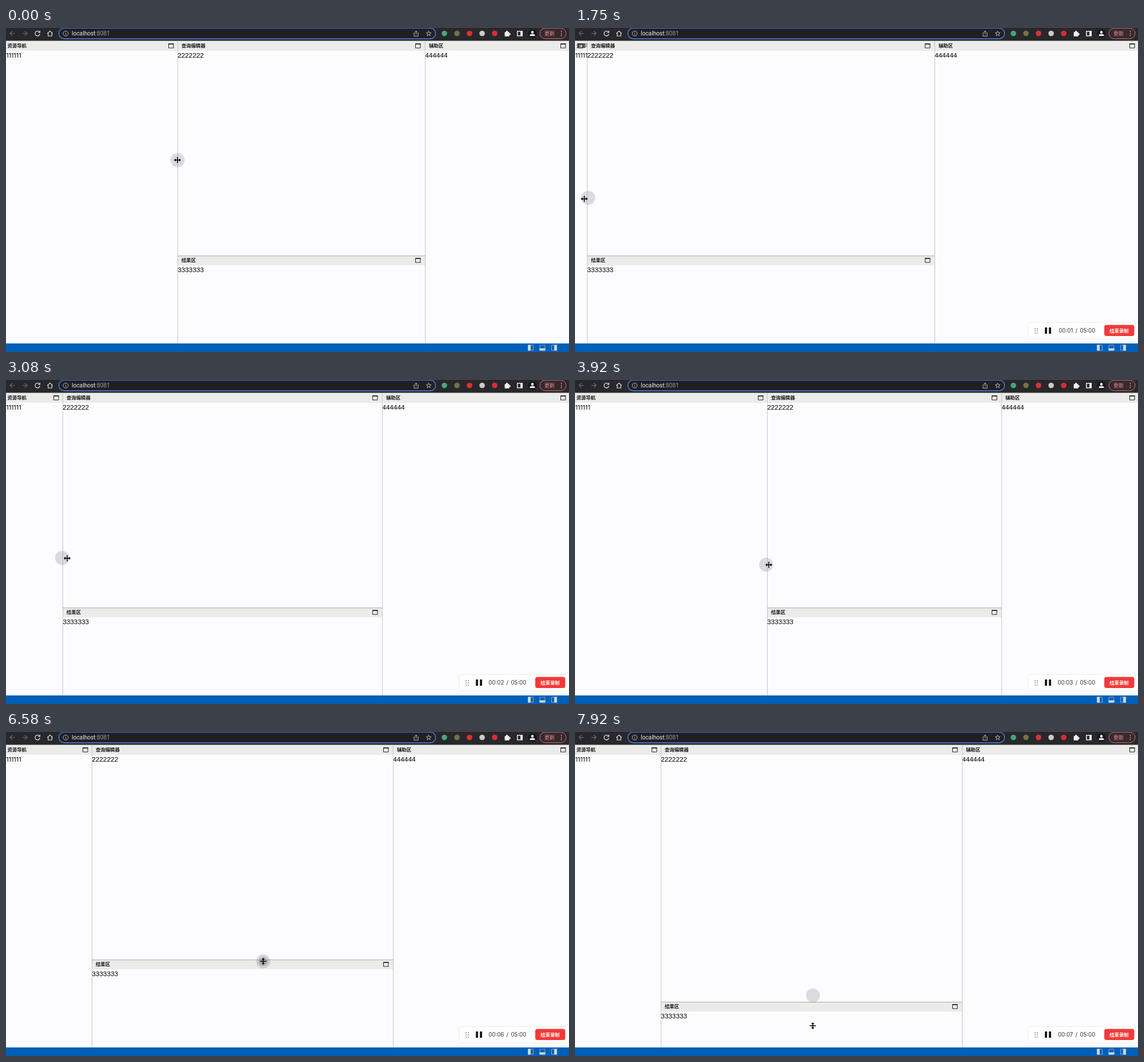
Write an HTML page that moves like this. It is 985 px wide and 568 px high and loops after 8 s.

```html
<!DOCTYPE html>
<html lang="zh">
<head>
<meta charset="utf-8">
<style>
html, body { margin: 0; width: 100%; height: 100%; overflow: hidden; background: #fcfcfe; }
svg { display: block; width: 100vw; height: 100vh; }
.title { font: bold 8.4px "Noto Sans CJK SC", "Noto Sans CJK", sans-serif; fill: #1a1a1a; }
.body { font: 11.8px "Liberation Sans", sans-serif; }
.slim { font: 10.8px Inter, sans-serif; }
.url { font: 10.2px Roboto, sans-serif; }
.clock { font: 9.7px Inter, sans-serif; fill: #333; }
.line { fill: none; stroke-width: 1.2; }
</style>
</head>
<body>
<svg viewBox="0 0 985 568" preserveAspectRatio="none">
  <defs>
    <g id="max">
      <path d="M.5 .5h8.5v7.5h-8.5z" fill="none" stroke="#222"/>
      <path d="M0 1h9.5" stroke="#222" stroke-width="1.6"/>
    </g>
    <g id="resize">
      <path id="cross" d="M0-5.5V5.5M-4 0H4" stroke="#000" stroke-width="1.5"/>
      <path d="M-6 0l3-2.8v5.6zM6 0l-3-2.8v5.6z"/>
    </g>
    <path id="arrow" d="M0-5V5L2.2 3L3.8 6.5L5.3 5.8L3.8 2.5H6.5z" stroke="#fff" stroke-width=".4"/>
  </defs>

  <g id="panes"></g>

  <!-- browser toolbar -->
  <rect width="985" height="22.5" fill="#28282c"/>
  <rect x="92.5" y=".3" width="659" height="18.6" rx="9.3" fill="#202024" stroke="#4377cc" stroke-width="1.6"/>
  <g class="line" stroke="#6d6d72">
    <path id="back" d="M15.5 9.5H7M11 5.5L7 9.5L11 13.5"/>
    <use href="#back" transform="translate(44) scale(-1 1)"/>
  </g>
  <g class="line" stroke="#e8e8ea">
    <path d="M58.4 7A4.2 4.2 0 1 0 59.2 10.5M59.3 4.8V8H56"/>
    <path d="M72.3 9.6L77 5.2L81.7 9.6M73.8 8.7V14H80.2V8.7"/>
  </g>
  <g class="line" stroke="#b8b8bc" style="stroke-width:1">
    <circle cx="104.5" cy="9.7" r="4.4"/><path d="M104.5 9V12.3M104.5 7V8"/>
    <path d="M715.5 8.3H714V14.3H721V8.3H719.5M717.5 11.3V5M715.5 7L717.5 5L719.5 7"/>
    <path id="star"/>
  </g>
  <text class="url" x="115" y="13.2" fill="#ececee">localhost<tspan fill="#98989c">:8081</tspan></text>
  <g id="extensions"></g>
  <g fill="#ededf0">
    <rect x="872.5" y="7" width="8" height="7.8" rx="1"/>
    <circle cx="876.5" cy="6.5" r="1.8"/><circle cx="881" cy="10.8" r="1.8"/>
    <path d="M894 5h10v9.5h-10zM895.5 6.5v6.5h4.5v-6.5z" fill-rule="evenodd"/>
    <circle cx="921" cy="9.5" r="7.5" fill="#17181c"/>
    <circle cx="921" cy="7.4" r="2.3"/><path d="M916.6 14v-1.4q0-2 4.4-2t4.4 2V14z"/>
  </g>
  <rect x="934" y=".3" width="46" height="18.4" rx="9.2" fill="#36292d" stroke="#c9777b"/>
  <text class="title" x="942" y="13" style="font-size:9px;font-weight:400;fill:#f0969a">更新</text>
  <path d="M971.5 5.8v8" stroke="#f0969a" stroke-width="2" stroke-linecap="round" stroke-dasharray="0 3.7"/>

  <rect y="553" width="985" height="15" fill="#0060b8"/>
  <g id="layouts"></g>

  <g id="recorder">
    <rect x="793" y="516.5" width="200" height="28.5" rx="4" fill="#fff" stroke="#ececf0"/>
    <path d="M805 526.5v10M808.8 526.5v10" stroke="#555" stroke-width="1.4" stroke-dasharray="1.4 2.4"/>
    <path d="M822 525h4v11h-4zM829 525h4v11h-4z" fill="#1f1f22"/>
    <text class="clock" id="elapsed" x="871.3" y="534.2" text-anchor="end"></text>
    <text class="clock" x="877.3" y="534.2" text-anchor="middle">/</text>
    <text class="clock" x="910.3" y="534.2" text-anchor="end">05:00</text>
    <rect x="926" y="520.5" width="52.5" height="19.5" rx="4" fill="#f33a38"/>
    <text class="title" x="952" y="533.6" text-anchor="middle" style="fill:#fff">结束录制</text>
  </g>

  <g id="halo">
    <circle r="12.3" fill="#80808e" opacity=".27"/>
    <circle id="press" r="8.2" fill="#5a645c" opacity=".28"/>
  </g>
  <use id="cursor"/>
</svg>
<script>
const FPS = 12, FRAMES = 96, WIDTH = 985, TOP = 23;
const $ = id => document.getElementById(id);
const move = (id, x, y) => $(id).setAttribute("transform", `translate(${x} ${y})`);

// Each pane covers everything to its right and below, so later panes clip earlier ones.
const pane = (id, title, text, font = "body") => `<g id="${id}">
  <rect width="${WIDTH}" height="531" fill="#fcfcfe"/>
  <rect width="${WIDTH}" height="17" fill="#ebebea"/>
  <text class="title" x="${id == "nav" ? 2.5 : 7}" y="11.3">${title}</text>
  <text class="${font}" x=".2" y="28.7">${text}</text>
  <use id="${id}Max" href="#max"/>
  ${id == "nav" ? "" : '<path d="M.5 0V531" stroke="#c6c6c4"/>'}
  ${id == "result" ? `<path d="M0 .5H${WIDTH}" stroke="#a9a9b0"/>` : ""}
</g>`;
$("panes").innerHTML =
  pane("nav", "资源导航", "111111", "slim") + pane("editor", "查询编辑器", "2222222") +
  pane("result", "结果区", "3333333") + pane("side", "辅助区", "444444");

$("extensions").innerHTML = ["#41a87c", "#77704a", "#d8342c", "#c9cacd", "#e2283a"]
  .map((color, i) => `<circle cx="${767 + i * 22}" cy="9.5" r="4.8" fill="${color}"/>`).join("");

$("layouts").innerHTML = ["M0 0h5v10h-5z", "M0 6h10v4h-10z", "M5 0h5v10h-5z"]
  .map((part, i) => `<g transform="translate(${913 + i * 20.5} 555.5)" fill="#d3d3cc">
    <path d="M.5 .5h9v9h-9z" fill="none" stroke="#86a6c4"/><path d="${part}"/></g>`).join("");

$("star").setAttribute("d", "M" + Array.from({ length: 10 }, (_, i) => {
  const angle = i * Math.PI / 5, radius = i % 2 ? 2 : 4.6;
  return [739.5 + radius * Math.sin(angle), 9.8 - radius * Math.cos(angle)];
}).join("L") + "z");

// Turning points of the pointer: [tick, x, y]; it eases from one to the next.
const turns = [
  [4.5, 300, 231.5], [22, 14, 300], [29.3, 264, 300], [35.5, 97, 312], [47, 339, 324],
  [56, 150, 288], [59, 150, 288], [62.7, 508, 341], [65.6, 448, 425], [69, 448, 425],
  [71.5, 450, 402], [81, 450, 402], [90.5, 418, 211], [95.4, 416, 520]
];

function pointer(tick) {
  const next = Math.max(1, turns.findIndex(turn => turn[0] >= tick));
  const [t0, x0, y0] = turns[next - 1], [t1, x1, y1] = turns[next];
  const progress = Math.max(0, (tick - t0) / (t1 - t0));
  const eased = (1 - Math.cos(Math.PI * progress)) / 2;
  return [x0 + (x1 - x0) * eased, y0 + (y1 - y0) * eased];
}

function draw(tick) {
  // Dividers and halo trail the pointer.
  const [dragX, dragY] = pointer(tick - 0.8);
  const left = Math.round(tick < 59 ? dragX : 150);
  const right = Math.round(621.5 + 0.371 * left);
  const split = Math.round(tick < 81 ? 399 : dragY - 3);

  move("editor", left, TOP);
  move("result", left, split);
  move("side", right, TOP);
  move("nav", 0, TOP);
  move("navMax", left - 16, 4);
  move("editorMax", right - left - 17, 4);
  move("resultMax", right - left - 17, 4);
  move("sideMax", 970 - right, 4);

  const [x, y] = pointer(tick), onRow = tick >= 71;
  move("halo", ...pointer(tick - 1));
  $("press").style.display = tick >= 3 && tick < 20 || tick >= 77 && tick < 88 ? "" : "none";
  $("cursor").setAttribute("href", tick >= 60 && !onRow ? "#arrow" : "#resize");
  $("cursor").setAttribute("transform", `translate(${x} ${y}) rotate(${onRow ? 90 : 0})`);

  $("recorder").style.display = tick ? "" : "none";
  $("elapsed").textContent = "00:0" + Math.max(0, Math.floor((tick - 5) / FPS));
}

function loop() {
  draw(Math.floor((performance.now() + 5) * FPS / 1000) % FRAMES);
  requestAnimationFrame(loop);
}
loop();
</script>
</body>
</html>
```
